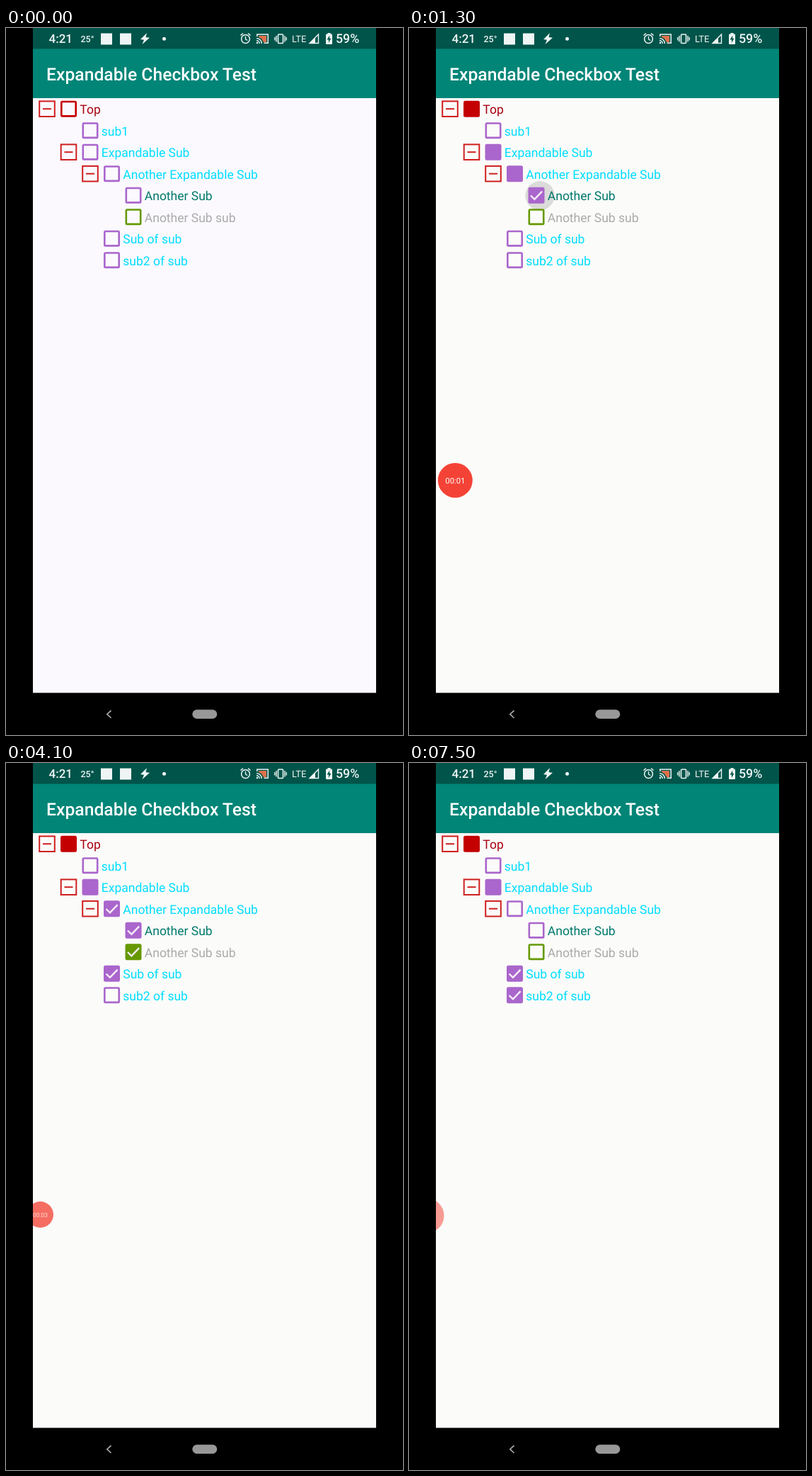
These frames come from a looping animation (561 by 998 pixels, 8000 ms). An HTML page with a canvas:

```html
<!DOCTYPE html>
<html lang="en">
<head>
<meta charset="utf-8">
<title>Expandable Checkbox Test</title>
<style>
html, body { margin: 0; width: 100%; height: 100%; overflow: hidden; background: #000; }
canvas { display: block; width: 561px; height: 998px; }
</style>
</head>
<body>
<canvas id="stage" width="561" height="998"></canvas>
<script>
const ctx = document.getElementById('stage').getContext('2d');
const LOOP = 8000, STEP = 100;
const FONT = 'Roboto, "Noto Sans", sans-serif';
const PURPLE = '#aa66cc', CYAN = '#00ddff', RED = '#c40000';

const rows = [
  { label: 'Top', depth: 0, box: RED, ink: '#a8000f', open: true },
  { label: 'sub1', depth: 1, box: PURPLE, ink: CYAN },
  { label: 'Expandable Sub', depth: 1, box: PURPLE, ink: CYAN, open: true },
  { label: 'Another Expandable Sub', depth: 2, box: PURPLE, ink: CYAN, open: true },
  { label: 'Another Sub', depth: 3, box: PURPLE, ink: '#00796b' },
  { label: 'Another Sub sub', depth: 3, box: '#669900', ink: '#aaaaaa' },
  { label: 'Sub of sub', depth: 2, box: PURPLE, ink: CYAN },
  { label: 'sub2 of sub', depth: 2, box: PURPLE, ink: CYAN }
];
rows.forEach((r, i) => { r.x = 88.5 + 30.5 * r.depth; r.y = 114.2 + 30.5 * i; });

const GREY = '0,0,0', PINK = '216,27,96';
const taps = [
  { at: 1150, row: 4, tint: GREY },
  { at: 2000, row: 5, tint: GREY },
  { at: 3600, row: 6, tint: GREY },
  { at: 4500, row: 7, tint: GREY },
  { at: 5800, row: 3, tint: PINK }
];

const clamp = v => Math.max(0, Math.min(1, v));
const ramp = (t, from, len) => clamp((t - from) / len);
const easeOut = p => 1 - (1 - p) * (1 - p);
const easeIO = p => p * p * (3 - 2 * p);
const mix = (a, b, p) => a + (b - a) * p;

function rect(x, y, w, h, color) {
  ctx.fillStyle = color;
  ctx.fillRect(x, y, w, h);
}
function disc(x, y, r, color) {
  ctx.fillStyle = color;
  ctx.beginPath();
  ctx.arc(x, y, r, 0, 7);
  ctx.fill();
}
function path(points, closed) {
  ctx.beginPath();
  points.forEach(([x, y]) => ctx.lineTo(x, y));
  if (closed) ctx.closePath();
}
function line(points, color, width) {
  path(points);
  ctx.strokeStyle = color;
  ctx.lineWidth = width;
  ctx.stroke();
}
function shape(points, color) {
  path(points, true);
  ctx.fillStyle = color;
  ctx.fill();
}
function round(x, y, w, h, r) {
  ctx.beginPath();
  ctx.roundRect(x, y, w, h, r);
}
function text(str, x, y, size, color, weight = 400, align = 'left') {
  ctx.font = `${weight} ${size}px ${FONT}`;
  ctx.textRendering = 'geometricPrecision';
  ctx.textAlign = align;
  ctx.fillStyle = color;
  ctx.fillText(str, x, y);
}

function statusBar() {
  const bar = '#00544a', ink = '#eef5f4';
  rect(38, 0, 485, 30, bar);
  text('4:21', 60.5, 21.3, 17, ink, 500);
  text('25°', 105.5, 20.3, 12.5, ink, 500);
  rect(134, 7.5, 16, 16, ink);
  rect(161, 7.5, 16, 16, ink);
  shape([[199, 7], [190, 16], [195, 16.8], [192.5, 23], [203, 13.7], [197.5, 13]], ink);
  disc(223.5, 15.2, 2.5, ink);

  // alarm
  ctx.strokeStyle = ink;
  ctx.lineWidth = 1.5;
  ctx.beginPath();
  ctx.arc(338.5, 15.5, 5.9, 0, 7);
  ctx.stroke();
  line([[338.5, 11.8], [338.5, 15.8], [341.3, 17.5]], ink, 1.3);
  line([[331.5, 10.5], [335, 7.5]], ink, 1.6);
  line([[345.5, 10.5], [342, 7.5]], ink, 1.6);

  // cast
  shape([[357, 11], [368, 11], [368, 20], [364, 20], [361, 15], [357, 13]], '#e0704a');
  line([[354.8, 12], [354.8, 9], [370.2, 9], [370.2, 21.3], [364.5, 21.3]], ink, 1.5);
  ctx.lineWidth = 1.4;
  for (const r of [4.3, 7.4]) {
    ctx.beginPath();
    ctx.arc(354, 22, r, -Math.PI / 2, 0);
    ctx.stroke();
  }
  disc(355, 21, 1.3, ink);

  // vibrate
  ctx.lineWidth = 1.6;
  round(384.5, 9, 7, 12.5, 1);
  ctx.stroke();
  for (const s of [-1, 1]) {
    line([[388 + s * 6, 11], [388 + s * 6, 19.5]], ink, 1.4);
    line([[388 + s * 8.2, 13], [388 + s * 8.2, 17.5]], ink, 1.4);
  }

  text('LTE', 404, 20.2, 13, ink);
  path([[429, 21.5], [441.5, 21.5], [441.5, 9]], true);
  ctx.strokeStyle = ink;
  ctx.lineWidth = 1.4;
  ctx.stroke();
  shape([[429, 21.5], [437, 21.5], [437, 13.5]], ink);

  // battery
  rect(454.5, 7, 4, 2, ink);
  ctx.fillStyle = ink;
  round(452, 8.5, 9, 14.5, 1);
  ctx.fill();
  shape([[457.2, 10.5], [453.6, 16.4], [456, 16.4], [455.8, 21], [459.4, 14.8], [457.2, 14.8]], bar);
  text('59%', 466, 21.4, 17.8, ink, 500);
}

function navBar() {
  line([[148.5, 963.5], [142.8, 968.7], [148.5, 974]], '#a6a6a6', 1.7);
  ctx.fillStyle = '#989898';
  round(263.3, 962.3, 35, 12.6, 6.3);
  ctx.fill();
}

// Parents are filled when any child is, and ticked when all are.
function treeState(t) {
  const turned = i => ramp(t, taps[i].at + 50, 100);
  const leaf = v => ({ fill: v, tick: v });
  const group = (...kids) => ({
    fill: Math.max(...kids.map(k => k.fill)),
    tick: Math.min(...kids.map(k => k.tick))
  });
  const sub1 = leaf(0);
  const a = leaf(turned(0) - turned(4)), b = leaf(turned(1) - turned(4));
  const c = leaf(turned(2)), d = leaf(turned(3));
  const inner = group(a, b);
  const outer = group(inner, c, d);
  return [group(sub1, outer), sub1, outer, inner, a, b, c, d];
}

function checkbox({ x, y, box }, { fill, tick }) {
  ctx.lineWidth = 2.6;
  ctx.strokeStyle = ctx.fillStyle = box;
  round(x - 10.2, y - 10.2, 20.4, 20.4, 1.2);
  ctx.stroke();
  ctx.globalAlpha = fill;
  ctx.fill();
  ctx.globalAlpha = tick;
  line([[x - 8, y + 0.3], [x - 2.6, y + 5.7], [x + 8.1, y - 5.6]], '#f6ecf8', 2.4);
  ctx.globalAlpha = 1;
}

function expander(x, y) {
  ctx.strokeStyle = '#cf1f1f';
  ctx.lineWidth = 2;
  ctx.strokeRect(x - 10.8, y - 10.8, 21.6, 21.6);
  line([[x - 6, y], [x + 6, y]], '#cf1f1f', 2);
}

function ripple(t, { at, row, tint }) {
  if (t <= at || t >= at + 500) return;
  const grow = easeOut(ramp(t, at, 200));
  const alpha = 0.13 * (1 - ramp(t, at + 250, 250));
  const { x, y } = rows[row];
  disc(x + 2.5 + 40 * (1 - grow), y + 0.5, 22 * grow, `rgba(${tint},${alpha})`);
}

function bubble(t) {
  const show = easeOut(ramp(t, 200, 200));
  if (!show) return;
  const shrink = easeIO(ramp(t, 2200, 300));
  const hide = easeIO(ramp(t, 4700, 400));
  const scale = show * mix(mix(1, 0.755, shrink), 1, hide);
  const x = mix(mix(65.3, 48.5, shrink), 25, hide);
  const y = mix(mix(638.5, 637.5, shrink), 639, hide);
  ctx.save();
  ctx.beginPath();
  ctx.rect(38, 99, 485, 839);
  ctx.clip();
  ctx.globalAlpha = show * mix(mix(1, 0.77, shrink), 0.52, hide);
  disc(x, y, 24.5 * scale, '#f44336');
  ctx.globalAlpha *= 1 - hide;
  const secs = Math.max(0, Math.floor((t - 200) / 1000));
  text('00:' + String(secs).padStart(2, '0'), x, y + 4 * scale, 11.2 * scale, '#fff', 400, 'center');
  ctx.restore();
}

function draw(t) {
  rect(0, 0, 561, 998, '#000');
  rect(38, 99, 485, 839.5, t < 200 ? '#fbf9fe' : '#fbfbf9');
  statusBar();
  rect(38, 29.5, 485, 69.5, '#008577');
  text('Expandable Checkbox Test', 57, 74, 24.7, '#fff', 500);
  taps.forEach(tap => ripple(t, tap));
  const state = treeState(t);
  rows.forEach((r, i) => {
    if (r.open) expander(r.x - 30.5, r.y);
    checkbox(r, state[i]);
    text(r.label, r.x + 15.8, r.y + 7, 17.5, r.ink);
  });
  bubble(t);
  navBar();
}

const start = performance.now();
function tick() {
  const t = (performance.now() - start) % LOOP;
  draw(Math.floor(t / STEP) * STEP);
  requestAnimationFrame(tick);
}
tick();
</script>
</body>
</html>
```
